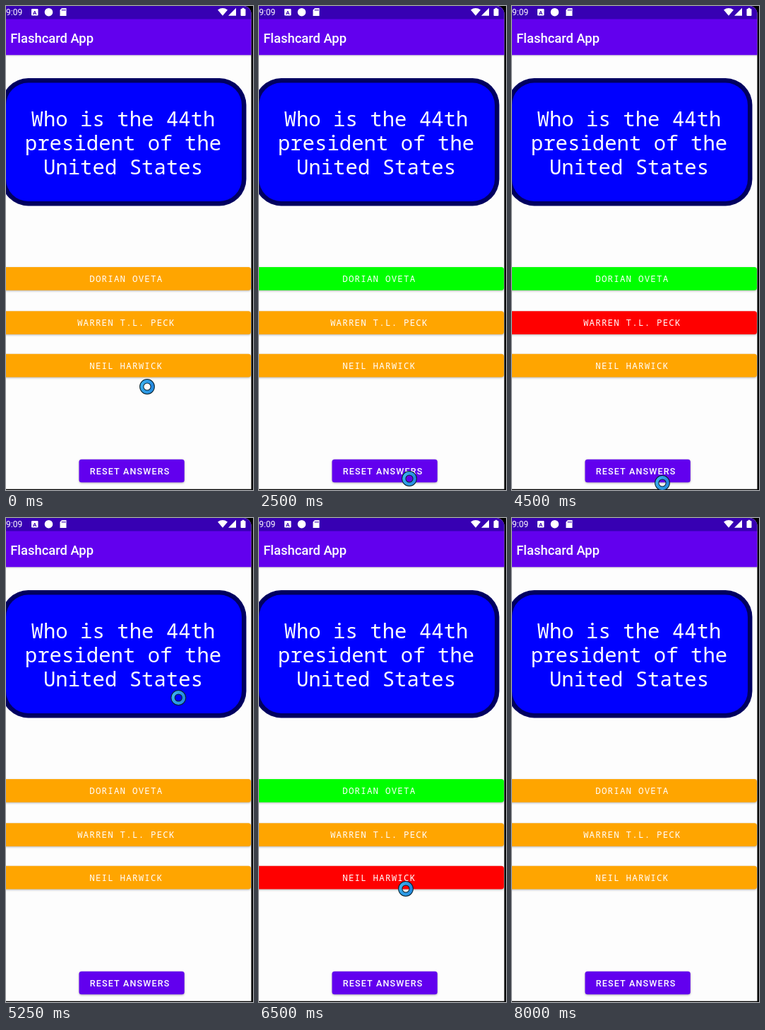
Animation of 350x684 px, one loop 8250 ms. Source, as an HTML page with a canvas:

```html
<!DOCTYPE html>
<html lang="en">
<head>
<meta charset="utf-8">
<title>Flashcard App</title>
<style>
html, body { margin: 0; width: 100%; height: 100%; overflow: hidden; background: #000; }
canvas { display: block; width: 350px; height: 684px; }
</style>
</head>
<body>
<canvas id="stage"></canvas>
<script>
const W = 350, H = 684, LOOP = 8250, STEP = 250;
const canvas = document.getElementById('stage');
const ctx = canvas.getContext('2d');
const dpr = window.devicePixelRatio || 1;
canvas.width = W * dpr;
canvas.height = H * dpr;

const MONO = '"Noto Sans Mono", "DejaVu Sans Mono", monospace';
const SANS = 'Roboto, "Noto Sans", sans-serif';
const PURPLE = '#6200ee', DARK_PURPLE = '#3700b3';
const AMBER = '#ffa500', PRESSED = '#ffbb44', GREEN = '#00ff00', RED = '#ff0000';

const answers = [
  { label: 'DORIAN OVETA', y: 369 },
  { label: 'WARREN T.L. PECK', y: 431.2 },
  { label: 'NEIL HARWICK', y: 491.8 }
];

// Each round: time of the press, chosen answer, time of the reset
const rounds = [
  { press: 1500, pick: 0, reset: 2750 },
  { press: 3500, pick: 1, reset: 4750 },
  { press: 6250, pick: 2, reset: 7500 }
];

// Pointer path: time, x, y
const path = [
  [0, 200, 538], [250, 200, 538], [1250, 209, 411], [1750, 209, 411],
  [2500, 213, 668], [2750, 213, 668], [3250, 207, 473], [3750, 207, 473],
  [4500, 213, 674], [4750, 213, 674], [5000, 245, 219], [5750, 243, 324],
  [6250, 208, 524], [6500, 208, 524], [7250, 198, 677], [7500, 198, 677],
  [7750, 198, 682]
];

function box(x, y, w, h, r, fill) {
  ctx.beginPath();
  ctx.roundRect(x, y, w, h, r);
  ctx.fillStyle = fill;
  ctx.fill();
}

function disc(x, y, r, fill) {
  ctx.beginPath();
  ctx.arc(x, y, r, 0, Math.PI * 2);
  ctx.fillStyle = fill;
  ctx.fill();
}

function ring(x, y, r, width, stroke) {
  ctx.beginPath();
  ctx.arc(x, y, r, 0, Math.PI * 2);
  ctx.lineWidth = width;
  ctx.strokeStyle = stroke;
  ctx.stroke();
}

function poly(points, fill) {
  ctx.beginPath();
  points.forEach(([x, y]) => ctx.lineTo(x, y));
  ctx.closePath();
  ctx.fillStyle = fill;
  ctx.fill();
}

function text(str, x, y, font, fill, align = 'left', spacing = 0) {
  ctx.font = font;
  ctx.letterSpacing = spacing + 'px';
  ctx.textAlign = align;
  ctx.fillStyle = fill;
  ctx.fillText(str, x, y);
}

function button(x, y, w, h, fill, raised) {
  ctx.save();
  ctx.shadowColor = raised ? 'rgba(0,0,0,0.35)' : 'rgba(0,0,0,0.3)';
  ctx.shadowBlur = (raised ? 7 : 3) * dpr;
  ctx.shadowOffsetY = (raised ? 3 : 1) * dpr;
  box(x, y, w, h, 3.5, fill);
  ctx.restore();
}

function statusBar() {
  ctx.fillStyle = DARK_PURPLE;
  ctx.fillRect(0, 0, W, 18.5);
  text('9:09', 0, 13, `12px ${SANS}`, '#fff');
  box(36, 4, 9.5, 9.5, 1, '#fff');
  text('A', 40.75, 11.6, `bold 8px ${SANS}`, DARK_PURPLE, 'center');
  disc(60.5, 8.7, 5.8, '#fff');
  poly([[79, 3], [85.5, 3], [85.5, 14], [76.5, 14], [76.5, 5.8]], '#fff');
  ctx.fillStyle = DARK_PURPLE;
  [79.2, 81.2, 83.2].forEach(x => ctx.fillRect(x, 4.5, 1, 2.4));

  ctx.beginPath();
  ctx.moveTo(307, 13.8);
  ctx.lineTo(300, 5.4);
  ctx.quadraticCurveTo(307, 0.6, 314, 5.4);
  ctx.closePath();
  ctx.fillStyle = '#fff';
  ctx.fill();
  poly([[326, 2.8], [326, 13.8], [315, 13.8]], '#fff');
  box(332.5, 4, 7, 10, 1, '#fff');
  ctx.fillRect(334.5, 2.8, 3, 2);
}

function appBar() {
  ctx.save();
  ctx.shadowColor = 'rgba(0,0,0,0.3)';
  ctx.shadowBlur = 3 * dpr;
  ctx.shadowOffsetY = dpr;
  ctx.fillStyle = PURPLE;
  ctx.fillRect(-10, 18, W + 20, 51.3);
  ctx.restore();
  text('Flashcard App', 6.2, 52, `500 18.4px ${SANS}`, '#fff');
}

function card() {
  box(-6.5, 102, 347, 180.5, 38, '#000060');
  box(0, 108.5, 334, 167.5, 31.5, '#0000ff');
  ['Who is the 44th', 'president of the', 'United States'].forEach((line, i) =>
    text(line, 166, 170 + i * 33.8, `29px ${MONO}`, '#fff', 'center'));
}

function answerColor(i, t) {
  for (const { press, pick, reset } of rounds) {
    if (t < press || t >= reset) continue;
    if (t < press + STEP) return i === pick ? PRESSED : AMBER;
    if (i === 0) return GREEN;
    if (i === pick) return RED;
  }
  return AMBER;
}

// The pointer is a ring with an open centre
function pointer(t) {
  const next = path.findIndex(p => p[0] > t);
  const last = path[path.length - 1];
  if (next < 0 && t > last[0]) return;
  let [, x, y] = last;
  if (next > 0) {
    const [t0, x0, y0] = path[next - 1], [t1, x1, y1] = path[next];
    const k = (t - t0) / (t1 - t0);
    x = x0 + (x1 - x0) * k;
    y = y0 + (y1 - y0) * k;
  }
  const blue = ctx.createConicGradient(Math.PI * 0.75, x, y);
  blue.addColorStop(0, '#2f9fe6');
  blue.addColorStop(0.2, '#3bb0ee');
  blue.addColorStop(0.6, '#2488e0');
  blue.addColorStop(1, '#2f9fe6');
  ring(x, y, 7.75, 6.3, '#08202c');
  ring(x, y, 7.75, 4.3, blue);
}

function draw(t) {
  ctx.setTransform(dpr, 0, 0, dpr, 0, 0);
  ctx.fillStyle = '#000';
  ctx.fillRect(0, 0, W, H);

  ctx.save();
  ctx.beginPath();
  ctx.roundRect(-20, 0, 367.5, 682.7, [0, 11, 0, 0]);
  ctx.clip();
  ctx.fillStyle = '#fdfdfd';
  ctx.fillRect(0, 0, W, H);
  appBar();
  statusBar();
  card();
  answers.forEach(({ label, y }, i) => {
    const fill = answerColor(i, t);
    button(-8, y, 355, 32.7, fill, fill === PRESSED);
    text(label, 170.3, y + 21, `12.6px ${MONO}`, '#fff', 'center', 1.12);
  });
  button(103.5, 640.7, 149.3, 32.5, PURPLE);
  text('RESET ANSWERS', 118.7, 661.7, `500 12.6px ${SANS}`, '#fff', 'left', 1.12);
  ctx.restore();

  pointer(t);
}

const start = performance.now();
function tick() {
  const t = (performance.now() - start) % LOOP;
  draw(Math.floor(t / STEP) * STEP);
  requestAnimationFrame(tick);
}
tick();
</script>
</body>
</html>
```
